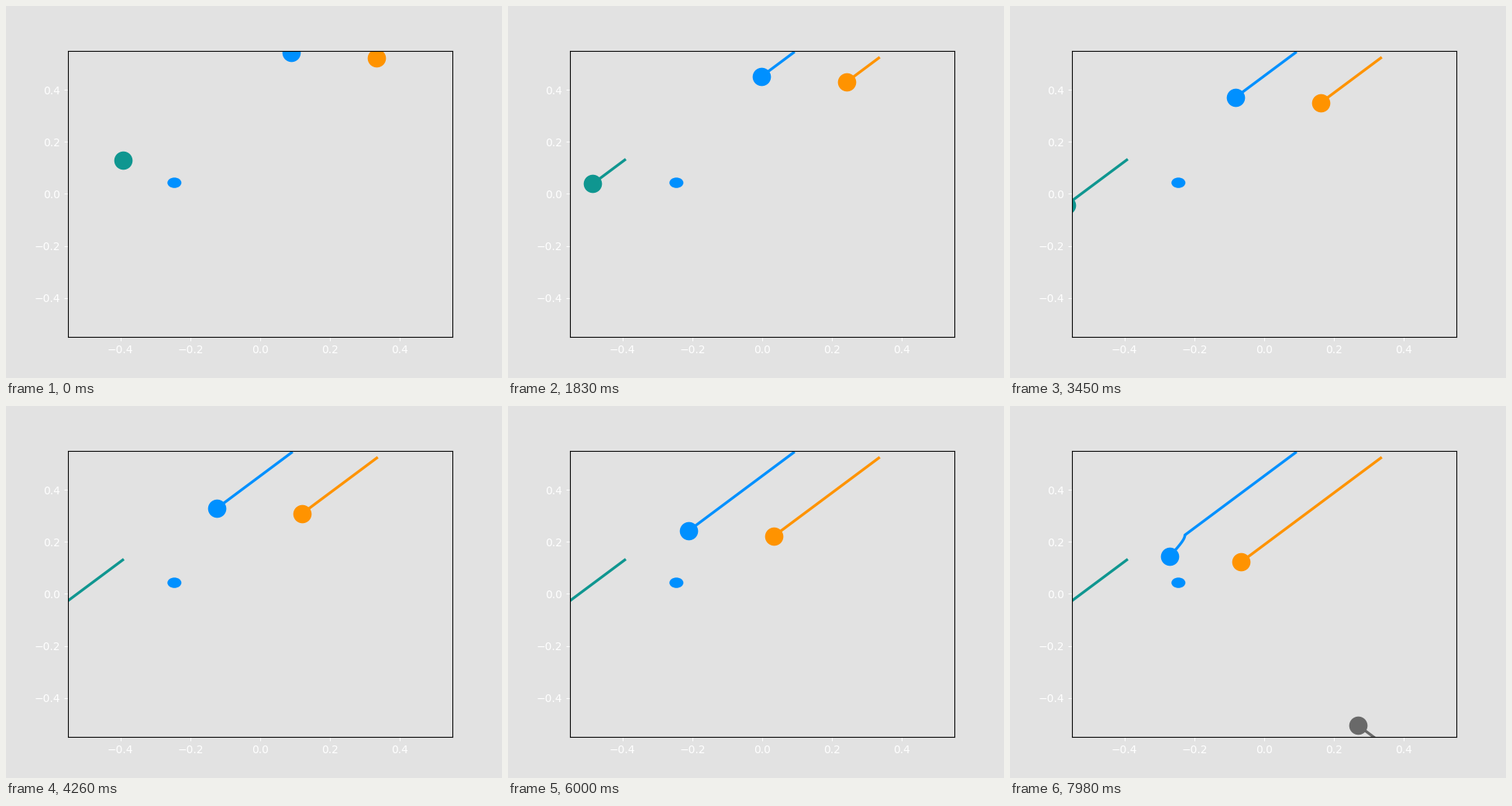
A matplotlib script for the animation above (8000 ms loop, 640 px wide and 480 px high).

```python
import numpy as np
import matplotlib.pyplot as plt
from matplotlib.animation import FuncAnimation
from matplotlib.patches import Circle

BACK = "#e2e2e2"
BLUE = "#0090ff"
ORANGE = "#ff9300"
TEAL = "#0f9690"
GRAY = "#696969"

INTERVAL = 20      # ms between drawn frames
STEP_MS = 30       # ms per simulation step
FRAMES = 400
SPEED = 0.0015     # data units per step on each axis
TURN = 211         # step at which the blue ball is deflected
LAST = 266

steps = np.arange(LAST + 1)


def straight(x, y, dx, dy):
    return x + dx * SPEED * steps, y + dy * SPEED * steps


def deflected(x, y):
    """Straight path whose sideways speed drops to zero and builds up again."""
    xs, ys = straight(x, y, -1, -1)
    after = np.maximum(steps - TURN, 0)
    drift = 0.001 * (after - 11.5 * (1 - np.exp(-after / 11.5)))
    return np.where(steps > TURN, xs[TURN] - drift, xs), ys


balls = [
    (TEAL, straight(-0.3934, 0.1302, -1, -1)),
    (BLUE, deflected(0.0896, 0.5424)),
    (ORANGE, straight(0.3334, 0.5217, -1, -1)),
    (GRAY, straight(0.6673, -0.9038, -1, 1)),
]

fig, ax = plt.subplots(figsize=(6.4, 4.8), dpi=100, facecolor=BACK)
ax.set_facecolor(BACK)
ax.set_xlim(-0.55, 0.55)
ax.set_ylim(-0.55, 0.55)
ticks = [-0.4, -0.2, 0.0, 0.2, 0.4]
ax.set_xticks(ticks)
ax.set_yticks(ticks)
ax.tick_params(colors="white")

ax.add_patch(Circle((-0.2455, 0.0426), 0.02, color=BLUE, lw=0))
trails = [ax.plot([], [], color=c, lw=2.5)[0] for c, _ in balls]
heads = [ax.plot([], [], "o", color=c, ms=16)[0] for c, _ in balls]


def update(i):
    n = min((i * INTERVAL + STEP_MS - INTERVAL) // STEP_MS, LAST)
    for (_, (xs, ys)), trail, head in zip(balls, trails, heads):
        trail.set_data(xs[:n + 1], ys[:n + 1])
        head.set_data([xs[n]], [ys[n]])
    return trails + heads


anim = FuncAnimation(fig, update, frames=FRAMES, interval=INTERVAL,
                     init_func=lambda: update(0), repeat=True,
                     repeat_delay=0, blit=False)
plt.show()
```
